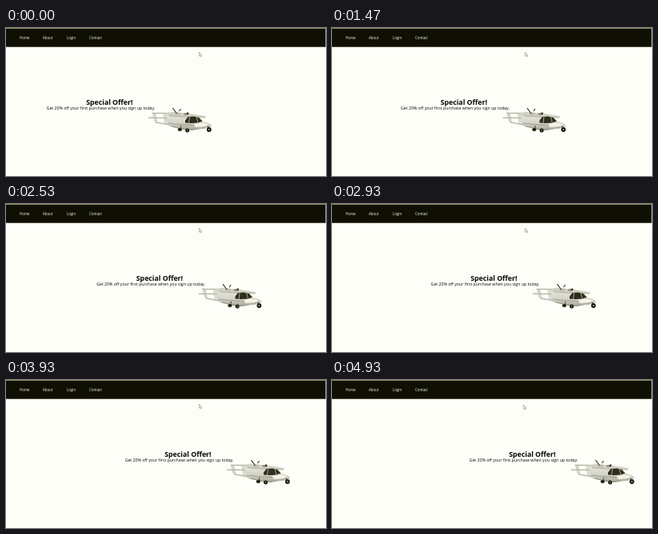
These frames come from a looping animation (400x185 px, 4.99 s). An HTML page:

```html
<!DOCTYPE html>
<html lang="en">
<head>
<meta charset="utf-8">
<title>Special offer</title>
<style>
html, body { margin: 0; width: 100%; height: 100%; overflow: hidden; background: #fefef8; }
svg { display: block; width: 400px; height: 185px; font-family: "Open Sans", "Noto Sans", sans-serif; }
</style>
</head>
<body>
<svg viewBox="0 0 400 185">
  <defs>
    <linearGradient id="hull" x2="0" y2="1">
      <stop offset="0" stop-color="#e6e6da"/>
      <stop offset=".55" stop-color="#d2d2c6"/>
      <stop offset="1" stop-color="#a3a396"/>
    </linearGradient>
  </defs>

  <rect width="400" height="1" fill="#8c8b48"/>
  <rect y="1" width="399" height="22.7" fill="#100f04"/>
  <rect x="399" y="1" width="1" height="22.7" fill="#8c8b48"/>
  <g font-size="4.4" fill="#fcfcf0">
    <text x="17" y="14">Home</text>
    <text x="46" y="14">About</text>
    <text x="76" y="14">Login</text>
    <text x="104" y="14">Contact</text>
  </g>

  <g id="banner">
    <g fill="#080802">
      <text x="100.2" y="95.6" font-size="8.75" font-weight="700">Special Offer!</text>
      <text x="50.6" y="102.3" font-size="5.22">Get 20% off your first purchase when you sign up today.</text>
    </g>

    <g id="plane">
      <!-- open tail: fins and booms -->
      <path d="M182.5 105.5L187 106 189.5 118 185.5 117Z" fill="#d3d3c8"/>
      <path d="M196 106L201 106 204 121 198 120Z" fill="#dcdcd1"/>
      <path d="M178 112.3L207 112.6M183 106.5L210 106.6M187 117.8L210 122" fill="none" stroke="#b9b9ad" stroke-width="1.5"/>
      <!-- hull -->
      <path d="M201 109Q213 107 227 109L242 111.5 246 117Q256 118.5 257 122.5 253 125.5 244 125L233 128Q224 128.5 213 125 207 124 202 121.5Z" fill="url(#hull)"/>
      <path d="M235 120Q247 116.5 255 121.5 246 123.5 237 124Z" fill="#f3f3e7"/>
      <path d="M203 119Q217 121 235 121.5M207 123Q221 127 234 127L250 125" fill="none" stroke="#8d8d7d" stroke-width=".7"/>
      <!-- wing and engines -->
      <path d="M196 107L209 104.8 230 107 250 110.2 248.5 112 226 111 204 109.5Z" fill="#d0d0c4"/>
      <path d="M204 109.7L226 111.2 249 112" fill="none" stroke="#8d8d7d" stroke-width=".6"/>
      <ellipse cx="215" cy="107.2" rx="3.6" ry="1.8" fill="#bdbdb0"/>
      <ellipse cx="225" cy="107.5" rx="3" ry="1.6" fill="#909080"/>
      <circle cx="227.2" cy="106.7" r="1.2" fill="#201f10"/>
      <path d="M208.5 100.2L213.5 107M216.5 104L218.5 101" stroke="#333220" stroke-width="1.1"/>
      <!-- cockpit -->
      <path d="M224 115.5L227.5 111 235 110.6 241 112 245.5 116.5 240 118.6 231 119 224 118.5Z" fill="#2f2e1c"/>
      <path d="M229.5 111L228.5 119M238 111L240 118.6" stroke="#b5b5a5" stroke-width=".9"/>
      <!-- landing gear -->
      <path d="M219 122L217.5 127M252 122L253.6 127" stroke="#55553f" stroke-width="1.1"/>
      <g fill="#1b1a0c">
        <ellipse cx="217.3" cy="127" rx="2.6" ry="2.1"/>
        <circle cx="226.6" cy="128" r="2.5"/>
        <circle cx="253.8" cy="127" r="2.9"/>
      </g>
      <g fill="#a9a99a">
        <circle cx="226.6" cy="128" r=".8"/>
        <circle cx="253.8" cy="127" r="1"/>
      </g>
    </g>
  </g>

  <path id="cursor" d="M241.3 30V35.2L242.5 34.1 243.4 36 244.3 35.6 243.5 33.8H245Z" fill="#fefef8" stroke="#77744f" stroke-width=".5"/>
</svg>
<script>
const LOOP = 4990, STEP = 1000 / 15, LAST = 74;
// The banner jumps ahead on its own slower tick.
const TICK = 85, JUMP = 121 / 58, PHASE = 0.73;
const banner = document.getElementById("banner");
const cursor = document.getElementById("cursor");
const start = performance.now();

function move(node, x, y = 0) {
  node.setAttribute("transform", `translate(${x} ${y})`);
}

function draw() {
  const time = (performance.now() - start) % LOOP;
  // 15 steps per second, with changes on 10 ms ticks
  const step = Math.min(LAST, Math.floor((Math.floor(time / 10) * 10 + 4) / STEP));
  move(banner, JUMP * Math.floor(step * STEP / TICK + PHASE));
  const nudge = Math.max(0, step - LAST + 2) / 2;
  move(cursor, -2 * nudge, nudge);
  requestAnimationFrame(draw);
}
draw();
</script>
</body>
</html>
```
